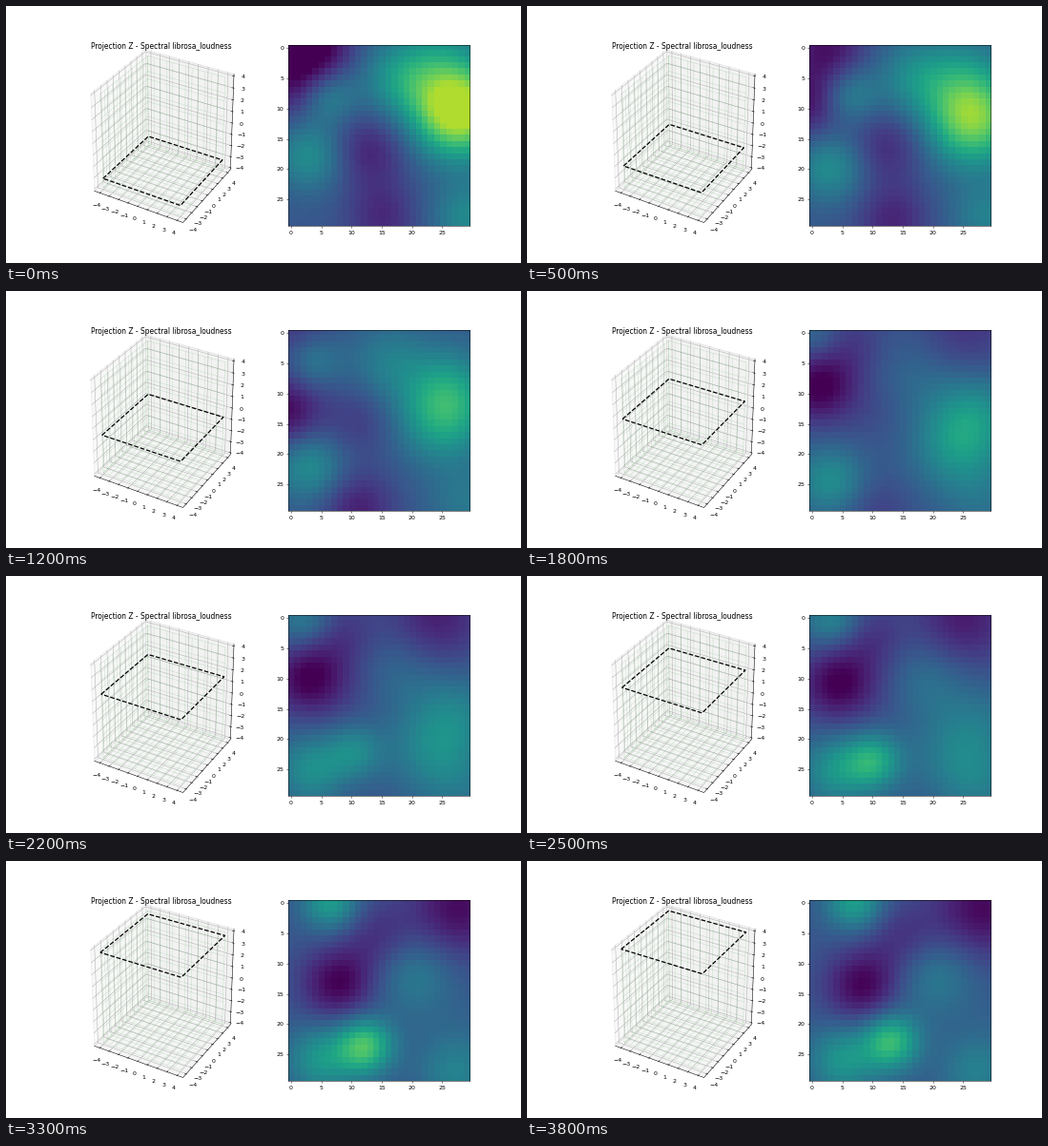
These frames come from a looping animation (540 by 270 pixels, 3900 ms). A matplotlib script:

```python
import numpy as np
import matplotlib.pyplot as plt
from matplotlib.animation import FuncAnimation

W, H, DPI = 540, 270, 45
FRAMES, STEP_MS, SLICES = 39, 100, 30
TICKS = np.arange(-4, 5)
E = 0.5 + 1 / 48         # panes reach a little past the unit cube
L = E + 0.0722           # distance of tick labels from the centre
XY, Z = 1 / 8.8, 1 / 8   # data units to cube units
R, F = 4 * XY, 4 * Z     # half sizes of the data volume

fig = plt.figure(figsize=(W / DPI, H / DPI), dpi=DPI, facecolor="white")


# --- perspective box on the left -------------------------------------------
box = fig.add_axes([0, 0, 1, 1])
box.set(xlim=(0, W), ylim=(H, 0))
box.axis("off")


def project(points):
    """Cube coordinates (centred on 0) to stage pixels, elev 30, azim -60."""
    el, az = np.radians(30), np.radians(-60)
    eye = np.array([np.cos(az) * np.cos(el), np.sin(az) * np.cos(el), np.sin(el)])
    right = np.array([-np.sin(az), np.cos(az), 0])
    up = np.cross(eye, right)
    p = np.atleast_2d(points)
    scale = 1 / (10 - p @ eye)
    return 165.2 + 1028 * scale * (p @ right), 133.5 - 1123.8 * scale * (p @ up)


def line(*points, **style):
    style = {"color": "black", "lw": 0.8, **style}
    box.plot(*project(points), **style)


def pane(*points, gray):
    box.fill(*project(points), color=(gray,) * 3, alpha=0.5, lw=0)
    line(*points, points[0], color=(gray - 0.05,) * 3)


def wires(values, side, height, **style):
    """Lines across the two back walls and the floor."""
    for v in values:
        a, b = v * XY, v * Z
        line((a, side, height), (a, side, -height), (a, -side, -height), **style)
        line((-side, a, height), (-side, a, -height), (side, a, -height), **style)
        line((-side, -side, b), (-side, side, b), (side, side, b), **style)


def tick(start, end, label_at, value):
    line(start, end)
    x, y = project(label_at)
    text = str(value).replace("-", "\N{MINUS SIGN}")
    box.text(x[0], y[0], text, fontsize=10, ha="center", va="top")


pane((-E, -E, -E), (-E, E, -E), (-E, E, E), (-E, -E, E), gray=0.95)
pane((-E, E, -E), (E, E, -E), (E, E, E), (-E, E, E), gray=0.9)
pane((-E, -E, -E), (E, -E, -E), (E, E, -E), (-E, E, -E), gray=0.925)
wires(TICKS, E, E, color="#b0b0b0")
wires(np.linspace(-4, 4, 13), R, F, color="green", lw=0.7, alpha=0.2)
line((-E, -E, -E), (E, -E, -E), (E, E, -E), (E, E, E))

OUT, IN = E + 0.0083, E - 0.0167
for t in TICKS:
    a, b = t * XY, t * Z
    tick((a, -OUT, -E), (a, -IN, -E), (a, -L, -L), t)
    tick((OUT, a, -E), (IN, a, -E), (L, a, -L), t)
    tick((OUT, E, b), (IN, E, b), (L, L, b), t)

box.text(162.6, 45.3, "Projection Z - Spectral librosa_loudness",
         fontsize=12, ha="center", va="baseline")
cut, = box.plot([], [], color="black", lw=2, ls="--", zorder=5)


# --- loudness map on the right ---------------------------------------------
# Each blob: radius, then (slice, x, y, strength) along its path.
WARM = [
    (5.3, (3, 27.5, 10.5, .7), (12, 25, 14, .31), (20, 23.5, 22, .18), (29, 25, 27, 0)),
    (4.6, (3, 18, 5, .24), (12, 16, 5, .15), (18, 17, 8, .05), (25, 20, 12, .15)),
    (3.3, (7, 6, 8, .2), (17, 1, 1, .14), (29, 7, 0, .3)),
    (4, (3, 3, 18, .22), (18, 3, 25, .22), (29, 5, 26, .25)),
    (3.3, (17, 11, 20, 0), (25, 9.5, 26, .52), (29, 13, 23, .4)),
    (4.9, (3, 25, 1, .14), (18, 27, 14, .18), (25, 28, 20, .02)),
    (4.2, (3, 29, 28, .2), (19, 28, 28, .06), (29, 27, 28, .16)),
]
COOL = [
    (4.3, (3, 4, 0, .3), (12, 1, 0, .12), (29, 15, 6, .13)),
    (4.2, (3, 0, 6, .2), (12, -1, 13, .25), (17, 1, 9, .28), (29, 8, 14, .23)),
    (4.3, (5, 13, 17, .17), (17, 10, 13, .04)),
    (4.1, (3, 15, 28, .15), (12, 11, 29, .18), (21, 10, 30, 0)),
    (5.6, (12, 28, -1, 0), (20, 24, 0, .18), (29, 28, 1, .25)),
]
ROWS, COLS = np.mgrid[:SLICES, :SLICES]


def bump(k, blob):
    radius, *path = blob
    ks, *tracks = zip(*path)
    x, y, strength = (np.interp(k, ks, track) for track in tracks)
    return strength * np.exp(-((COLS - x) ** 2 + (ROWS - y) ** 2) / (2 * radius ** 2))


def loudness(k):
    field = 0.27 + sum(bump(k, b) for b in WARM) - sum(bump(k, b) for b in COOL)
    return np.clip(field, 0, 0.88)


side = 0.775 / 2.2
panel = fig.add_axes([0.9 - side, 0.11, side, 0.77])
image = panel.imshow(loudness(3), cmap="viridis", vmin=0, vmax=1)
panel.set(xticks=range(0, SLICES, 5), yticks=range(0, SLICES, 5))


def update(i):
    k = min(SLICES - 1, int(3.6 + 0.75 * i))
    z = (8 * k / (SLICES - 1) - 4) * Z
    corners = [(-R, -R, z), (-R, R, z), (R, R, z), (R, -R, z), (-R, -R, z)]
    cut.set_data(*project(corners))
    image.set_data(loudness(k))
    return cut, image


anim = FuncAnimation(fig, update, frames=FRAMES, interval=STEP_MS,
                     repeat=True, repeat_delay=0, blit=False)
plt.show()
```
